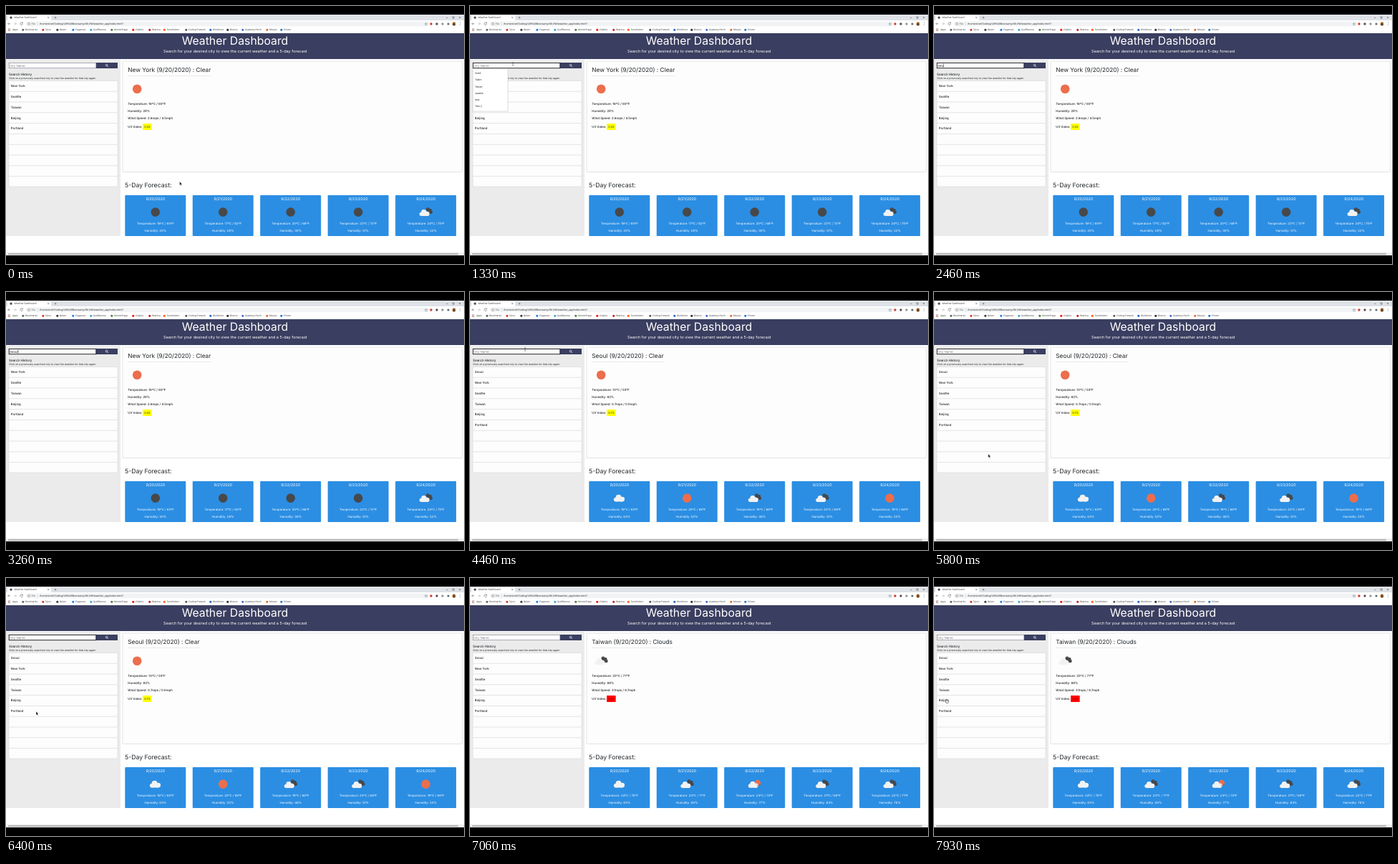
Recreate the animation shown at these times as an HTML page. Size 640x360 px, loop 8 s.

```html
<!DOCTYPE html>
<html lang="en">
<head>
<meta charset="utf-8">
<title>Weather Dashboard</title>
<style>
html, body { margin: 0; width: 100%; height: 100%; overflow: hidden; background: #fff; }
svg { display: block; width: 640px; height: 360px; }
text { font-family: Inter, Lato, sans-serif; text-rendering: geometricPrecision; white-space: pre; }
.ui text, text.ui { font-family: "Noto Sans", "Open Sans", sans-serif; }
</style>
</head>
<body>
<svg id="stage" viewBox="0 0 640 360" xmlns="http://www.w3.org/2000/svg">
  <defs>
    <g id="sun"><circle r="6.3" fill="#ec6e4c"/></g>
    <g id="night"><circle r="6.3" fill="#48484a"/></g>
    <g id="cloud" fill="#f2f2f2">
      <circle cx="-5" cy="2" r="2.9"/><circle cx="-1.2" cy="-.9" r="4"/>
      <circle cx="3.9" cy="1.5" r="3.4"/><rect x="-5" y="0" width="9" height="4.9"/>
    </g>
    <g id="broken">
      <g fill="#48484a">
        <circle cx="2.8" cy="-3.8" r="2.5"/><circle cx="6.2" cy="-2.6" r="2.2"/>
        <circle cx="7.3" cy=".2" r="2.2"/><path d="M1 -3L6-4L8 2.3L4 2Z"/>
      </g>
      <use href="#cloud" transform="translate(-1.6 .9) scale(.92)"/>
    </g>
    <g id="shower">
      <circle cx="4.2" cy="-1.6" r="4.3" fill="#ec6e4c"/>
      <use href="#cloud" transform="translate(-1.6 .6) scale(.92)"/>
      <path d="M3 1l2.4 2.4M5.6 0l2.2 2.4" stroke="#48484a" stroke-width=".7"/>
    </g>
    <path id="arrow" d="M0 0V5L1.1 4L1.9 5.7L2.7 5.3L1.9 3.7H3.4Z" fill="#111" stroke="#fff" stroke-width=".3"/>
    <path id="beam" d="M-.9 -2.3Q0 -2.3 0 -1.7Q0 -2.3 .9 -2.3M0 -1.8V1.8M-.9 2.3Q0 2.3 0 1.7Q0 2.3 .9 2.3" fill="none" stroke="#222" stroke-width=".45"/>
    <path id="hand" d="M-.6 -2.2Q0 -2.8 .5 -2.2V-.5L2.4 0Q2.9 .2 2.8 1L2.3 2.9H-.5L-1.9 .8Q-1.7 .1 -.6 .8Z" fill="#fff" stroke="#111" stroke-width=".5"/>
  </defs>
  <g id="chrome" class="ui"></g>
  <g id="page"></g>
  <g id="now"></g>
  <g id="days"></g>
  <g id="past"></g>
  <g id="field"></g>
  <g id="list" class="ui"></g>
  <use id="mouse"/>
</svg>
<script>
const LOOP = 8000;
const NAVY = '#3a3e60';
const $ = id => document.getElementById(id);
const esc = s => s.replace(/&/g, '&amp;').replace(/</g, '&lt;');
const text = (x, y, size, s, fill = '#212529', extra = '') =>
  `<text x="${x}" y="${y}" font-size="${size}" fill="${fill}" ${extra}>${esc(s)}</text>`;
const mid = (x, y, size, s, fill, extra = '') => text(x, y, size, s, fill, 'text-anchor="middle" ' + extra);
const box = (x, y, w, h, fill, extra = '') =>
  `<rect x="${x}" y="${y}" width="${w}" height="${h}" fill="${fill}" ${extra}/>`;
const dot = (x, y, r, fill) => `<circle cx="${x}" cy="${y}" r="${r}" fill="${fill}"/>`;
const line = (d, color = '#5f6368', w = .6) => `<path d="${d}" fill="none" stroke="${color}" stroke-width="${w}"/>`;
const MEDIUM = 'font-weight="500"';

// icon, Celsius, Fahrenheit, humidity
const cities = {
  'New York': {
    sky: 'Clear', icon: 'sun', temp: '16ºC / 60ºF', hum: 29, wind: '2.6mps / 4.5mph', uv: '3.02', tone: '#ffff00',
    days: [['night', 16, 60, 30], ['night', 17, 62, 29], ['night', 20, 68, 38], ['night', 22, 72, 51], ['broken', 24, 75, 52]]
  },
  'Seoul': {
    sky: 'Clear', icon: 'sun', temp: '13ºC / 55ºF', hum: 82, wind: '0.7mps / 0.0mph', uv: '5.72', tone: '#ffff00',
    days: [['cloud', 16, 60, 63], ['sun', 20, 68, 50], ['broken', 19, 66, 48], ['broken', 20, 68, 51], ['sun', 19, 66, 53]]
  },
  'Taiwan': {
    sky: 'Clouds', icon: 'broken', temp: '25ºC / 77ºF', hum: 88, wind: '3.1mps / 6.7mph', uv: '9.83', tone: '#ff0000',
    days: [['cloud', 24, 75, 83], ['broken', 22, 71, 80], ['shower', 23, 73, 77], ['broken', 21, 69, 83], ['broken', 22, 71, 76]]
  }
};
const history = ['New York', 'Seattle', 'Taiwan', 'Beijing', 'Portland'];
const hints = ['Sirell', 'Tobin', 'Tester', 'seattle', 'test', 'Test 2'];
const marks = [
  [27, 'Bookmarks', '#5f6368'], [55, 'Tavro', '#d93025'], [75, 'Belvor', '#333'], [97, 'Pagecove', '#1877f2'],
  [122, 'QuillBarrow', '#39a0c8'], [151, 'MondoTrapp', '#4a7a3a'], [181, 'ClipOra', '#f00'], [204, 'Reelova', '#d0101c'],
  [224.5, 'TuneHarbor', '#f50'], [255, 'Coding Prework', '#555'], [289, 'WorkKnot', '#0a66c2'], [313, 'Branvo', '#222'],
  [334, 'Academy Perch', '#3d6bd0'], [368, 'Merjun', '#e2662a'], [388, 'Printer', '#1a73b8']
];

function drawChrome() {
  let s = box(0, 0, 640, 12, '#000') + box(0, 12, 640, 8, '#dee1e6') + box(0, 20, 640, 18, '#fff')
    + box(2, 12.7, 61, 8, '#fff', 'rx="1.5"') + dot(7, 16.2, 1.6, '#4b4f54')
    + text(11.5, 17.4, 3.3, 'Weather Dashboard', '#333')
    + line('M58.2 15.2l2 2m0-2l-2 2M67.5 16.2h3m-1.5-1.5v3')
    + line('M615 16.5h2.4M624 15h2.2v2.2h-2.2zM633 15l2.2 2.2m0-2.2l-2.2 2.2', '#444', .5)
    + line('M6 24.8H2.6m1.6-1.6L2.6 24.8l1.6 1.6')
    + line('M11 24.8h3.4m-1.6-1.6l1.6 1.6l-1.6 1.6', '#aaa')
    + line('M23.2 23.8a1.8 1.8 0 1 0 .2 1.4M23.4 22.6v1.4h-1.5')
    + box(28, 21.6, 563, 6.6, '#f1f3f4', 'rx="3.3"')
    + `<circle cx="32" cy="24.9" r="1.5" fill="none" stroke="#5f6368" stroke-width=".5"/>`
    + text(35.5, 26.1, 3.4, 'File', '#5f6368') + line('M44.3 23v4', '#bbb', .4)
    + text(47, 26.1, 3.45, '/home/sirell/Coding/UW%20Bootcamp/06-HW/weather_app/index.html?', '#222')
    + line('M587 23.2l.6 1.2l1.3.1l-1 .9l.3 1.3l-1.2-.7l-1.2.7l.3-1.3l-1-.9l1.3-.1z', '#5f6368', .4)
    + dot(594, 25, 1.7, '#d0392b') + dot(602, 25, 1.7, '#555') + dot(610, 25, 1.7, '#999') + dot(618, 25, 1.5, '#5f6368')
    + dot(626, 24.8, 2.6, '#c98f4a') + dot(626, 24.2, 1, '#3a2620') + '<path d="M624 26.5q2-2.4 4 0q-2 1.6-4 0z" fill="#3a2620"/>'
    + [23.3, 24.9, 26.5].map(y => dot(634.5, y, .45, '#5f6368')).join('');
  for (let i = 0; i < 9; i++) s += box(3 + i % 3 * 1.2, 31.5 + (i / 3 | 0) * 1.2, .8, .8, ['#d93025', '#1a73e8', '#34a853'][i % 3]);
  s += text(9, 34.4, 3.3, 'Apps', '#333');
  for (const [x, name, color] of marks) s += dot(x - 3.2, 33.2, 1.5, color) + text(x, 34.4, 3.2, name, '#333');
  $('chrome').innerHTML = s;
}

function drawPage() {
  $('page').innerHTML = box(0, 38, 640, 36, NAVY)
    + mid(320, 54, 15.8, 'Weather Dashboard', '#fff')
    + mid(320.3, 65.2, 5.5, 'Search for your desired city to view the current weather and a 5-day forecast', '#fff')
    + box(0, 75, 160, 246, '#ebebeb')
    + box(126, 79, 30, 8, NAVY)
    + `<circle cx="140.6" cy="82.6" r="1.3" fill="none" stroke="#fff" stroke-width=".7"/>` + line('M141.5 83.5l1.4 1.4', '#fff', .8)
    + text(4, 96.6, 4.55, 'Search History', undefined, MEDIUM)
    + text(4, 102.4, 3.5, 'Click on a previously searched city to view the weather for that city again')
    + box(163, 77, 474.5, 154.5, '#fdfdfd', 'stroke="#d8d8d8" stroke-width=".7" rx=".8"')
    + text(166, 252.5, 8.7, '5-Day Forecast:')
    + box(0, 343.8, 640, 4.2, '#f1f1f1') + box(3, 344.8, 629, 2.4, '#b8b8b8')
    + box(0, 348, 640, 12, '#000');
}

function drawNow(name) {
  const c = cities[name], small = (y, s) => text(170.3, y, 4.35, s, undefined, MEDIUM);
  $('now').innerHTML = text(170.3, 92, 8.3, `${name} (9/20/2020) : ${c.sky}`, undefined, 'id="head"')
    + `<use href="#${c.icon}" x="183.2" y="115.7"/>`
    + small(137.7, 'Temperature: ' + c.temp) + small(148, `Humidity: ${c.hum}%`)
    + small(158.2, 'Wind Speed: ' + c.wind) + small(169.7, 'UV Index:')
    + box(191, 164, 12.7, 9, c.tone, 'rx=".7"') + mid(197.3, 169.8, 4.1, c.uv, c.tone === '#ff0000' ? '#8a0c0c' : '#333');
  const end = 170.3 + $('head').getComputedTextLength();
  $('now').innerHTML += line(`M170 97.5H${end + .5}`, '#d5d5d5', .5);
}

function drawDays(name) {
  $('days').innerHTML = cities[name].days.map(([icon, c, f, hum], i) => {
    const x = 166.3 + i * 94.45, m = x + 42.5;
    return box(x, 264, 85, 57, '#2b8ee3', 'rx="1"') + mid(m, 270.9, 5.3, `9/${20 + i}/2020`, '#fff')
      + `<use href="#${icon}" x="${m}" y="287.6"/>`
      + mid(m, 304.5, 4.3, `Temperature: ${c}ºC / ${f}ºF`, '#fff') + mid(m, 314.8, 4.35, `Humidity: ${hum}%`, '#fff');
  }).join('');
}

function drawPast(added) {
  const rows = added ? ['Seoul', ...history] : history;
  let s = box(4, 104.4, 152, 147.6, '#fdfdfd', 'stroke="#d2d2d2" stroke-width=".5"');
  for (let i = 0; i < 10; i++) {
    if (i) s += line(`M4 ${104.4 + i * 14.8}H156`, '#d2d2d2', .6);
    if (rows[i]) s += text(6.8, 113.2 + i * 14.8, 4.35, rows[i], undefined, MEDIUM);
  }
  $('past').innerHTML = s;
}

function drawField(typed, focus, caret) {
  $('field').innerHTML = box(4.2, 79.4, 121.6, 7.3, '#fff', `stroke="${focus ? '#15151c' : '#777a8c'}" stroke-width="${focus ? .9 : .6}"`)
    + text(5.2, 84.7, 4.3, typed || 'City Name', typed ? '#111' : '#757575', 'id="entry"');
  if (caret) {
    const x = typed ? 5.5 + $('entry').getComputedTextLength() : 5;
    $('field').innerHTML += line(`M${x} 80.6V85.6`, '#000', .5);
  }
}

function drawList(open, typed) {
  const hits = open ? hints.filter(h => h.toLowerCase().startsWith(typed.toLowerCase())) : [];
  $('list').innerHTML = hits.length ? box(4, 87.3, 49, 4.2 + hits.length * 9.25, '#fff', 'stroke="#c4c4c4" stroke-width=".6"')
    + hits.map((h, i) => text(7, 95 + i * 9.25, 3.65, h, '#222')).join('') : '';
}

const keys = [[1800, 'S'], [2200, 'Se'], [2460, 'Seo'], [2860, 'Seou'], [3060, 'Seoul'], [3800, '']];
// start, end, from, to
const moves = [
  [60, 930, 242.6, 245, 60, 81], [4460, 4800, 77, 80, 77, 80], [5130, 5800, 77, 80, 75.8, 226],
  [6000, 6730, 75.8, 226, 17, 156.5], [7600, 7930, 17, 156.5, 17.5, 171.5]
];

function drawMouse(t) {
  const hidden = t >= 1800 && t < 4460 || t >= 6930 && t < 7600;
  $('mouse').setAttribute('visibility', hidden ? 'hidden' : 'visible');
  const [a, b, x0, y0, x1, y1] = moves.filter((m, i) => !i || t >= m[0]).pop();
  const u = Math.min(1, Math.max(0, (t - a) / (b - a))), k = u * u * (3 - 2 * u);
  const x = x0 + (x1 - x0) * k, y = y0 + (y1 - y0) * k;
  const kind = x < 126 && y > 79 && y < 87 ? 'beam' : x < 40 && y > 104 && y < 193 ? 'hand' : 'arrow';
  $('mouse').setAttribute('href', '#' + kind);
  $('mouse').setAttribute('transform', `translate(${x.toFixed(2)} ${y.toFixed(2)})`);
}

const last = new Map();
function update(draw, ...args) {
  const key = args.join('|');
  if (last.get(draw) === key) return;
  last.set(draw, key);
  draw(...args);
}

function render(t) {
  const typed = keys.filter(k => t >= k[0]).map(k => k[1]).pop() || '';
  const focus = t >= 1200 && t < 6730;
  const caret = focus && t >= 1800 && t < 3800 && (t < 3260 || (t - 3260) % 1060 < 530);
  update(drawNow, t < 3800 ? 'New York' : t < 6930 ? 'Seoul' : 'Taiwan');
  update(drawDays, t < 3860 ? 'New York' : t < 7060 ? 'Seoul' : 'Taiwan');
  update(drawPast, t >= 3800);
  update(drawField, typed, focus, caret);
  update(drawList, t >= 1270 && t < 3060, typed);
  drawMouse(t);
}

drawChrome();
drawPage();
const start = performance.now();
function tick() {
  render((performance.now() - start) % LOOP);
  requestAnimationFrame(tick);
}
tick();
</script>
</body>
</html>
```
